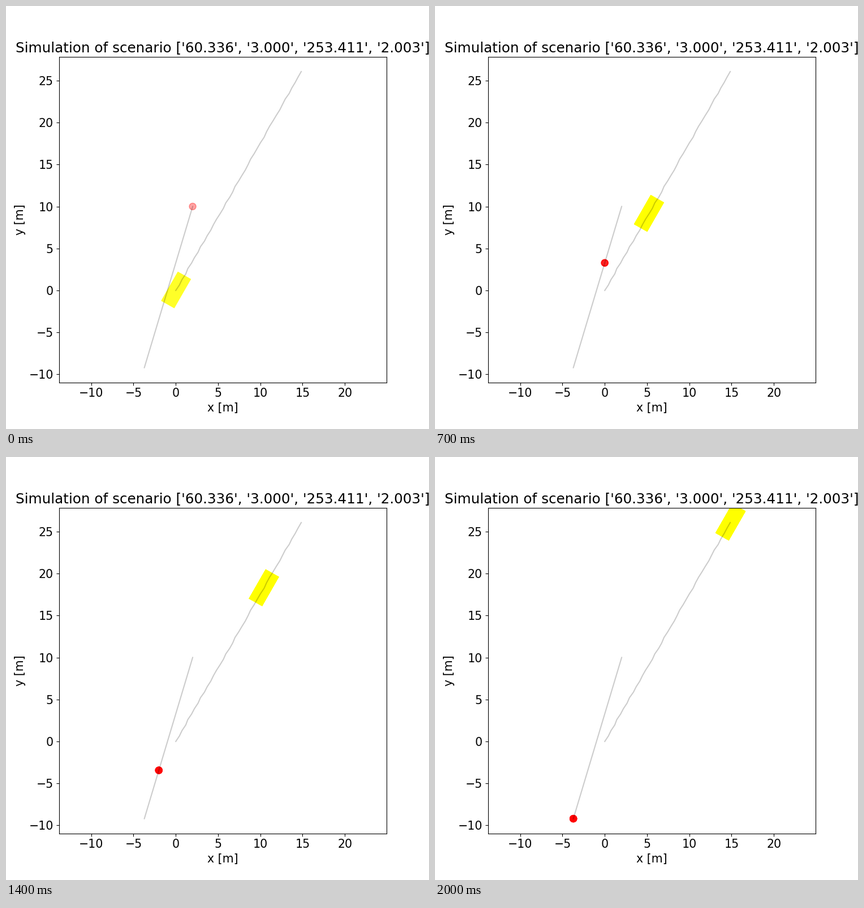
A matplotlib script that plays this animation: 748 by 748 pixels, repeating every 2100 ms.

```python
import numpy as np
import matplotlib.pyplot as plt
from matplotlib.animation import FuncAnimation
from matplotlib.patches import Circle, Rectangle

plt.rcParams.update({"font.family": "DejaVu Sans", "font.size": 14.8})

FRAMES, INTERVAL, DT = 21, 100, 0.5
CAR_HEADING, CAR_SPEED = 60.336, 3.000
WALK_HEADING, WALK_SPEED = 253.411, 2.003
CAR_SIZE = np.array([4.0, 1.8])
CAR_START, WALK_START = np.array([0.035, 0.06]), np.array([2.0, 10.0])
MARGIN = 0.05


def travel(start, heading, speed, step):
    a = np.radians(heading)
    step = np.asarray(step)[..., None]
    return start + speed * DT * step * np.array([np.cos(a), np.sin(a)])


def car_pos(step):
    return travel(CAR_START, CAR_HEADING, CAR_SPEED, step)


def walk_pos(step):
    return travel(WALK_START, WALK_HEADING, WALK_SPEED, step)


# Car track: a straight run with a slight sideways wobble
rng = np.random.default_rng(4)
half_steps = np.linspace(0, FRAMES - 1, 2 * FRAMES - 1)
car_track = travel(np.zeros(2), CAR_HEADING, CAR_SPEED, half_steps)
car_track[1:-1, 0] += rng.uniform(-0.07, 0.07, len(half_steps) - 2)
walk_track = walk_pos(np.arange(FRAMES))

# Same span on both axes, set by the taller extent
points = np.vstack([car_track, walk_track])
low, high = points.min(axis=0), points.max(axis=0)
mid, half = (low + high) / 2, (high - low).max() * (0.5 + MARGIN)

fig, ax = plt.subplots(figsize=(748 / 100, 748 / 100), dpi=100)
ax.set(xlim=(mid[0] - half, mid[0] + half), ylim=(mid[1] - half, mid[1] + half),
       xticks=range(-10, 21, 5), yticks=range(-10, 26, 5),
       xlabel="x [m]", ylabel="y [m]")
params = [f"{v:.3f}" for v in (CAR_HEADING, CAR_SPEED, WALK_HEADING, WALK_SPEED)]
ax.set_title(f"Simulation of scenario {params}")

for track in (car_track, walk_track):
    ax.plot(*track.T, color="black", alpha=0.2)

# Translucent layers pile up, one more per step, so the bodies grow opaque
cars = [ax.add_patch(Rectangle((0, 0), *CAR_SIZE, angle=CAR_HEADING,
                               rotation_point="center", color="yellow",
                               alpha=0.6, lw=0))
        for _ in range(FRAMES + 1)]
walkers = [ax.add_patch(Circle((0, 0), 0.4, color="red", alpha=0.2, lw=1))
           for _ in range(FRAMES + 1)]


def update(step):
    corner, center = car_pos(step) - CAR_SIZE / 2, walk_pos(step)
    for layer, (car, walker) in enumerate(zip(cars, walkers)):
        car.set_xy(corner)
        walker.set_center(center)
        car.set_visible(layer < step + 2)
        walker.set_visible(layer < step + 2)
    return cars + walkers


anim = FuncAnimation(fig, update, frames=FRAMES, interval=INTERVAL,
                     repeat=True, repeat_delay=0)
plt.show()
```
